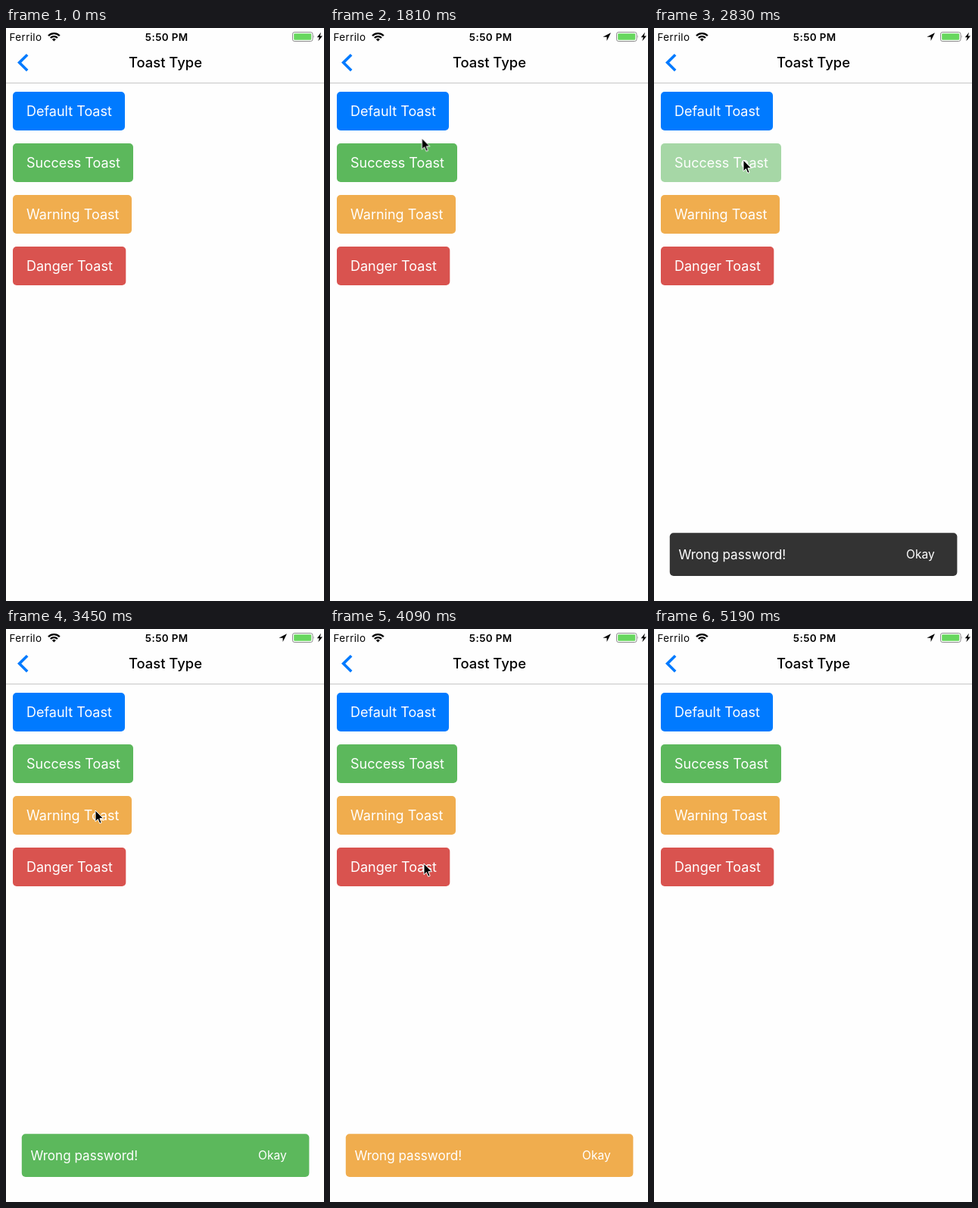
These frames come from a looping animation (420x755 px, 6.18 s). An HTML page:

```html
<!DOCTYPE html>
<html lang="en">
<head>
<meta charset="utf-8">
<title>Toast Type</title>
<style>
  html, body { margin: 0; width: 100%; height: 100%; overflow: hidden; background: #fefefe; }
  svg { display: block; width: 100%; height: 100%; }
  text { font-family: Inter, Roboto, sans-serif; font-size: 18px; fill: #fff; }
  .status { font-size: 13.4px; letter-spacing: .4px; fill: #000; }
  .title { font-size: 18.4px; font-weight: 500; fill: #000; }
  .message { font-size: 17.1px; }
  .action { font-size: 15.6px; }
  .wifi { fill: none; stroke: #000; stroke-width: 2.3; }
</style>
</head>
<body>
<svg viewBox="0 0 420 755">
  <!-- status bar -->
  <text class="status" x="4.5" y="16.6">Ferrilo</text>
  <path class="wifi" d="M56 10.2a10.4 10.4 0 0 1 14.8 0M58.8 13a6.5 6.5 0 0 1 9.2 0"/>
  <path d="M63.4 17.4l-2.5-2.5a3.6 3.6 0 0 1 5 0z"/>
  <text class="status" x="212.2" y="16.6" text-anchor="middle" font-weight="600">5:50 PM</text>
  <path id="location" d="M371 6.2L360.4 11.7H365.6V17z"/>
  <rect x="378.5" y="5.5" width="26.5" height="12" rx="2.6" fill="#fff" stroke="#8c8c8c"/>
  <rect x="380.2" y="7.2" width="23" height="8.6" rx="1.2" fill="#67d75e"/>
  <path d="M406.3 9.3q1.8 2.2 0 4.4z" fill="#8c8c8c"/>
  <path d="M416 5.8L410.8 12.2H413.8L412.4 17.2L418 10.6H414.8z"/>

  <!-- header -->
  <path d="M28.2 35.2L17.6 45.6L28.2 56" fill="none" stroke="#007aff" stroke-width="3.6"/>
  <text class="title" x="210.5" y="51.6" text-anchor="middle">Toast Type</text>
  <rect y="72" width="420" height="1" fill="#c6c6c6"/>

  <g id="buttons"></g>

  <g id="toast" opacity="0">
    <rect id="panel" x="20.8" y="665.3" width="379.6" height="56.7" rx="5" fill="#333"/>
    <text class="message" x="32.4" y="700.2">Wrong password!</text>
    <text class="action" x="333" y="699.4">Okay</text>
  </g>

  <path id="cursor" d="M0 0V14.8L3.4 11.6L5.8 17.2L8.2 16.2L5.9 10.7H10.5z"
        stroke="#fff" stroke-width="1" visibility="hidden"/>
</svg>
<script>
const LOOP = 6180;
const SMOOTH = 'cubic-bezier(.455,.03,.515,.955)';
const $ = id => document.getElementById(id);
const start = document.timeline.currentTime || 0;

// rows: [time in ms, value, easing towards the next row]
function play(el, prop, rows, easing = 'linear') {
  const first = rows[0], last = rows[rows.length - 1];
  const padded = [[0, first[1]], ...rows, [LOOP, last[1]]];
  const frames = padded.map(([time, value, ease = easing]) =>
    ({ offset: time / LOOP, [prop]: value, easing: ease }));
  el.animate(frames, { duration: LOOP, iterations: Infinity }).startTime = start;
}

const buttons = [
  { label: 'Default', color: '#007aff', width: 148, release: 2155 },
  { label: 'Success', color: '#5cb85c', width: 159, release: 2860 },
  { label: 'Warning', color: '#f0ad4e', width: 157, release: 3570 },
  { label: 'Danger', color: '#d9534f', width: 149.3, release: 4280 }
];

function addButton({ label, color, width, release }, i) {
  const y = 84 + 68 * i;
  const g = document.createElementNS('http://www.w3.org/2000/svg', 'g');
  g.innerHTML = `<rect x="9" y="${y}" width="${width}" height="51" rx="5" fill="${color}"/>
    <text x="27" y="${y + 32}">${label} Toast</text>`;
  $('buttons').append(g);
  play(g, 'opacity', [
    [release - 100, 1], [release - 10, .5], [release, .5], [release + 250, 1]
  ], SMOOTH);
}
buttons.forEach(addButton);

play($('location'), 'visibility', [[0, 'hidden'], [180, 'visible']], 'step-end');

play($('toast'), 'opacity', [
  [2125, 0, 'ease-in-out'], [2325, 1], [4970, 1, 'ease-in-out'], [5185, 0]
]);
play($('panel'), 'fill', [
  [0, '#333'],
  ...buttons.slice(1).map(b => [b.release + 10, b.color])
], 'step-end');

const path = [
  [1320, 245, 751, 'cubic-bezier(.4,0,.45,1)'],
  [1920, 116, 119],
  [2000, 118, 108],
  [2350, 118, 108, SMOOTH],
  [2620, 118, 174],
  [3000, 118, 174, SMOOTH],
  [3300, 118, 239],
  [3690, 118, 239, SMOOTH],
  [3960, 124, 309],
  [4380, 124, 309, 'ease-in'],
  [4540, 302, 710, 'ease-out'],
  [4650, 330, 718, SMOOTH],
  [4810, 341, 700],
  [4960, 341, 700, 'ease-in'],
  [5185, 336, 758]
];
play($('cursor'), 'transform',
  path.map(([time, x, y, ease]) => [time, `translate(${x}px, ${y}px)`, ease]));
play($('cursor'), 'visibility',
  [[0, 'hidden'], [1320, 'visible'], [5190, 'hidden']], 'step-end');
</script>
</body>
</html>
```
